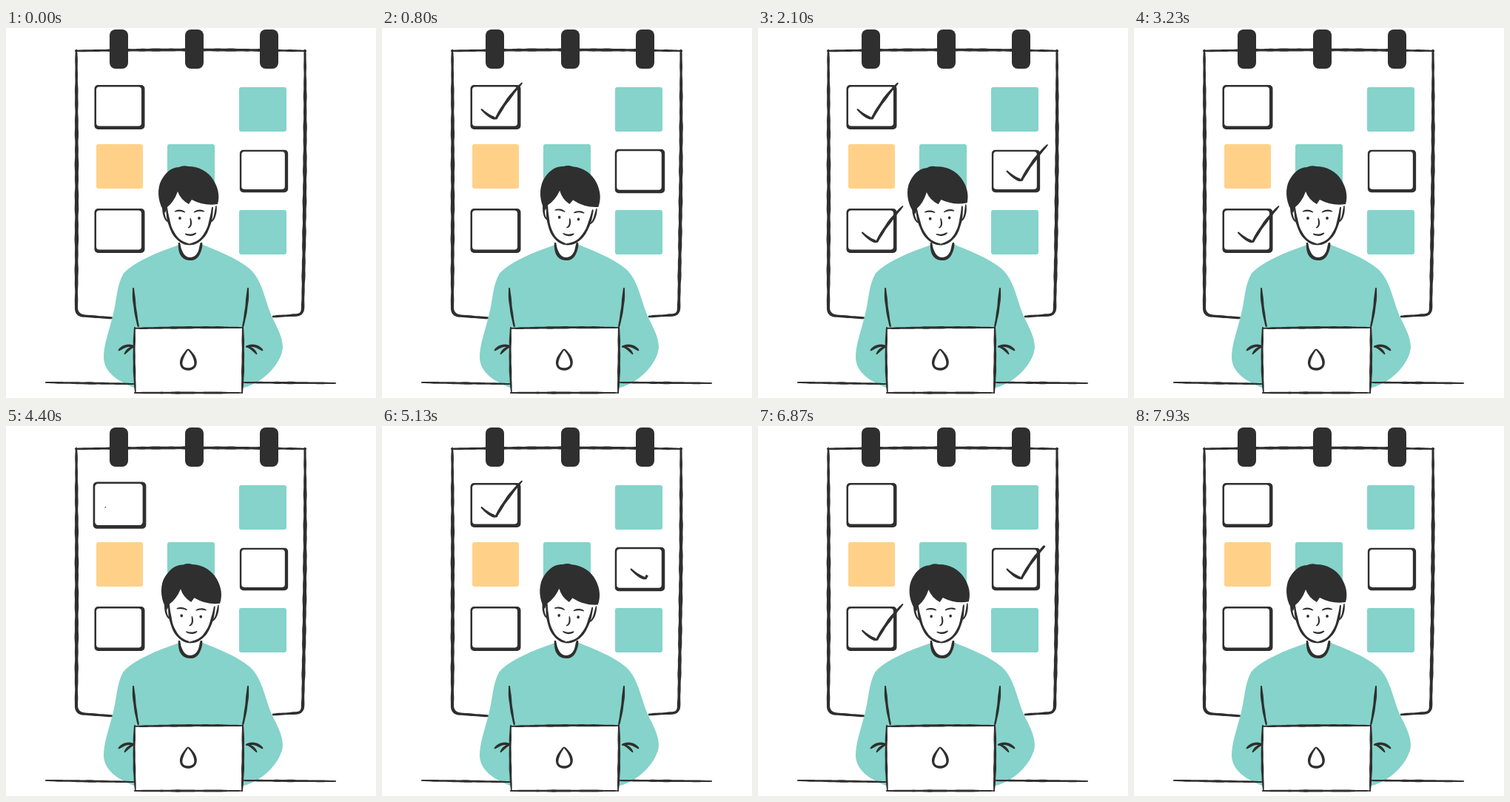
Animation of 500x500 px, one loop 8230 ms. Source, as an HTML page with a canvas:

```html
<!DOCTYPE html>
<html lang="en">
<head>
<meta charset="utf-8">
<title>Checking off the board</title>
<style>
html, body { margin: 0; height: 100%; overflow: hidden; background: #fff; }
canvas { display: block; width: 100vw; height: 100vh; }
</style>
</head>
<body>
<canvas id="stage" width="500" height="500"></canvas>
<script>
const ctx = document.getElementById('stage').getContext('2d');
const INK = '#2f2f2f', TEAL = '#85d3ca', YELLOW = '#ffd188';
const CYCLE = 4115;

const clamp = v => Math.max(0, Math.min(1, v));
const ease = (t, start, time) => (1 - Math.cos(Math.PI * clamp((t - start) / time))) / 2;

function fill(shape, color) {
  ctx.fillStyle = color;
  ctx.fill(typeof shape === 'string' ? new Path2D(shape) : shape, 'nonzero');
}

function block(x, y, w, h, r, color) {
  const path = new Path2D();
  path.roundRect(x, y, w, h, r);
  fill(path, color);
}

function local(draw) {
  ctx.save();
  draw();
  ctx.restore();
}

// Draws something, then its mirror image about the vertical line at axis.
function mirrored(axis, draw) {
  draw();
  local(() => {
    ctx.transform(-1, 0, 0, 1, 2 * axis, 0);
    draw();
  });
}

// Outline of a brush stroke: swelling in the middle, with a rough edge.
function strokeShape(d, width, part) {
  const line = document.createElementNS('http://www.w3.org/2000/svg', 'path');
  line.setAttribute('d', d);
  const length = line.getTotalLength(), end = length * part;
  const steps = Math.ceil(end / 3) + 2;
  const left = [], right = [];
  for (let s = 0; s <= steps; s++) {
    const pos = end * s / steps, k = pos / length;
    const p = line.getPointAtLength(pos);
    const a = line.getPointAtLength(pos - .5), b = line.getPointAtLength(pos + .5);
    const span = Math.hypot(b.x - a.x, b.y - a.y) || 1;
    const swell = .45 + .55 * Math.sqrt(Math.sin(Math.PI * clamp(k)));
    const rough = 1 + .08 * Math.sin(pos * .31 + length) + .08 * Math.sin(pos * .13);
    const half = width * swell * rough / 2 / span;
    const nx = (a.y - b.y) * half, ny = (b.x - a.x) * half;
    left.push(`${p.x + nx} ${p.y + ny}`);
    right.unshift(`${p.x - nx} ${p.y - ny}`);
  }
  return new Path2D('M' + left.concat(right).join('L') + 'Z');
}

const shapes = new Map();

function ink(d, width = 2.8, part = 1) {
  if (part <= 0) return;
  if (part < 1) return fill(strokeShape(d, width, part), INK);
  const key = d + width;
  if (!shapes.has(key)) shapes.set(key, strokeShape(d, width, 1));
  fill(shapes.get(key), INK);
}

function drawBoard() {
  ink('M93 31Q250 28 406 31', 4);
  ink('M95 29Q96 200 95 378Q95 388 105 389L145 392', 5);
  ink('M404 29Q405 210 401 380Q400 388 392 388L360 390', 5);
  for (const x of [140, 242, 343]) block(x, 2, 25, 53, 8, INK);
  for (const [x, y] of [[315, 80], [218, 157], [315, 246]]) block(x, y, 64, 60, 3, TEAL);
  block(122, 157, 63, 60, 3, YELLOW);
}

const boxes = [
  { x: 153.5, y: 106.5, size: 1, tickX: 154, tickY: 122.5 },
  { x: 348.5, y: 193, size: .96, tickX: 356, tickY: 206 },
  { x: 153.5, y: 273.5, size: 1, tickX: 160.5, tickY: 289 }
];

// Each box swells, gets its tick, and later loses it from the tip back.
function drawBox(box, i, t) {
  const swell = Math.sin(Math.PI * clamp((t - 40 - 620 * i) / 500)) ** 2;
  const shown = ease(t, 250 + 550 * i, 540) - ease(t, 2080 + 580 * i, 560);
  const scale = box.size * (1 + .055 * swell);
  local(() => {
    ctx.translate(box.x, box.y);
    ctx.scale(scale, scale);
    const ring = new Path2D();
    ring.roundRect(-34, -29.5, 68, 60, 5);
    ring.roundRect(-31.5, -27, 61, 53, 4);
    ctx.fillStyle = INK;
    ctx.fill(ring, 'evenodd');
  });
  local(() => {
    ctx.translate(box.tickX, box.tickY);
    ink('M-20 -13Q-9 -2 0 0Q14 -26 35.5 -48.5', 4, shown);
  });
}

function drawBody() {
  fill('M234 293C205 303 172 316 158 333C149 350 150 368 144 390C138 414 132 428 132 446C133 464 148 476 173 486L321 486C347 480 373 453 374 431C374 413 360 396 354 376C347 355 343 338 330 326C311 310 285 301 264 292Z', TEAL);
  fill('M234 285V294Q236 312 249 312Q262 312 264 294V285Z', '#fff');
  ink('M234 290Q235 312 249 312Q262 312 264 290', 4.5);
  mirrored(249.5, () => {
    ink('M172 351Q173 378 179 404', 3.6);
    ink('M152 436Q162 426 175 431', 3.6);
    ink('M160 441Q165 433 174 430', 3);
  });
}

function drawDesk() {
  ink('M53 479Q110 480 174 481', 3);
  ink('M320 479L446 480', 3);
  block(174, 405, 146, 88, 3, '#fff');
  ink('M173 406Q250 404 321 405', 3.2);
  ink('M174 404Q172 450 175 494', 3.2);
  ink('M173 493H320', 3);
  ink('M320 404Q321 450 319 494', 3.6);
  ink('M246 434C233 449 234 461 246 461C260 461 259 446 246 434', 3.6);
}

function headAngle(t) {
  return 5.7 * ease(t, 20, 540) - 8.6 * ease(t, 860, 990) + 2.9 * ease(t, 2080, 1140);
}

function drawHead(t) {
  local(() => {
    ctx.translate(249, 303);
    ctx.rotate(headAngle(t) * Math.PI / 180);
    ctx.translate(-249, -303);
    mirrored(248, () => {
      fill('M213 238Q213 259 220 262Q227 291 249 293V215H225Z', '#fff');
      ink('M212 240Q213 260 220 262', 2.4);
      ink('M217 242Q221 290 249 292.5', 3.4);
      ink('M228 248Q235 245 242 249', 2.2);
      block(233.2, 255, 3.6, 4, 2, INK);
    });
    fill('M215 250C206 238 204 222 208 210C213 198 222 188 234 188Q240 185 246 187C261 187 273 194 280 205C287 216 289 227 286 238Q268 241 251 232L247 238Q236 232 232 221Q227 235 218 242Z', INK);
    ink('M249 257Q252 268 246 270', 2.2);
    ink('M242 278Q250 282 257 277', 2.4);
  });
}

function frame() {
  const t = performance.now() % CYCLE;
  ctx.fillStyle = '#fff';
  ctx.fillRect(0, 0, 500, 500);
  drawBoard();
  boxes.forEach((box, i) => drawBox(box, i, t));
  drawBody();
  drawDesk();
  drawHead(t);
  requestAnimationFrame(frame);
}
frame();
</script>
</body>
</html>
```
